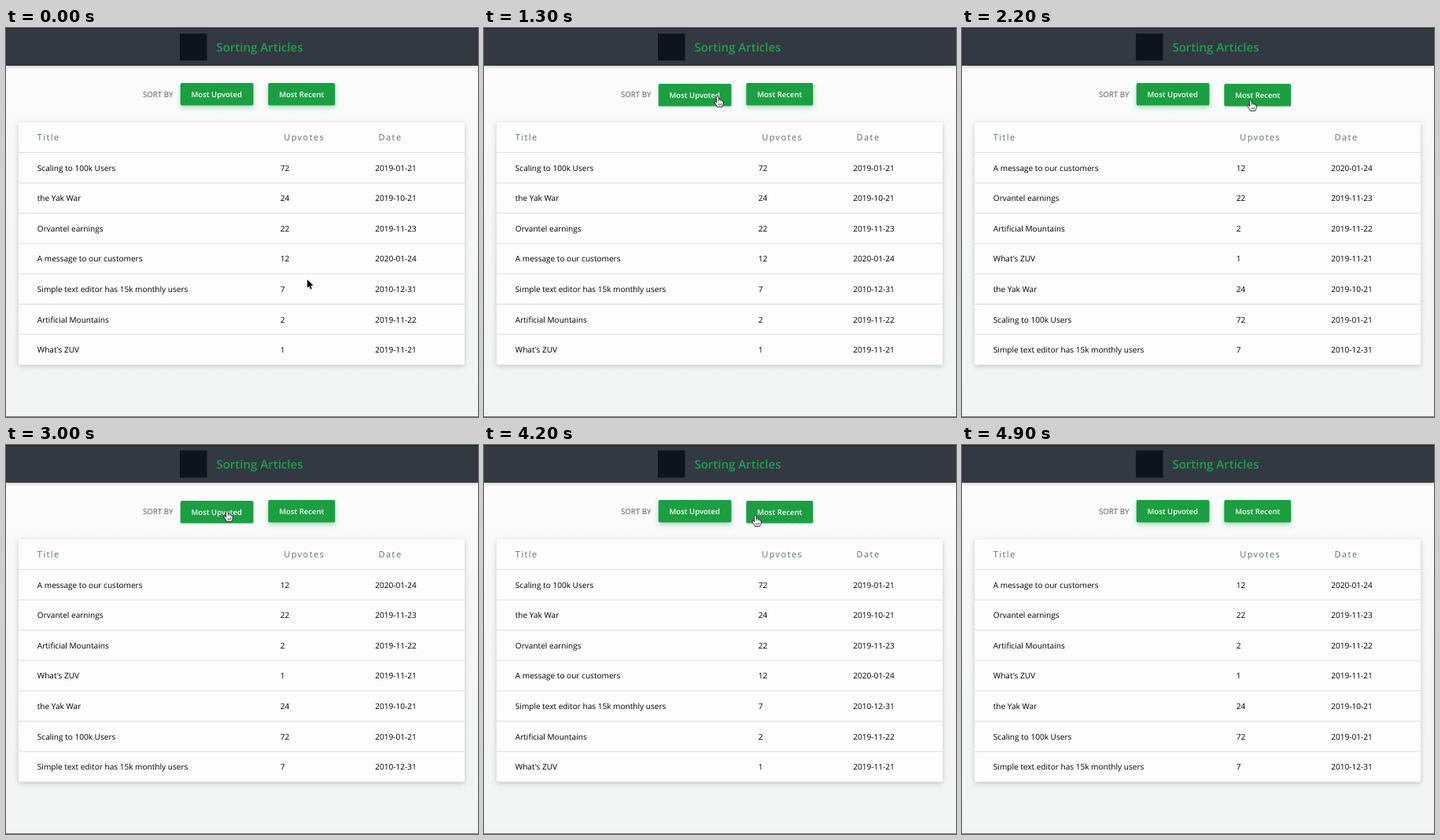
An HTML page for the animation above (5 s loop, 600 by 495 pixels).

```html
<!DOCTYPE html>
<html lang="en">
<head>
<meta charset="utf-8">
<title>Sorting Articles</title>
<style>
  html, body { margin: 0; width: 100%; height: 100%; overflow: hidden; }
  svg { display: block; width: 600px; height: 495px; }
  text {
    font: 10.08px "Open Sans", "Noto Sans", sans-serif;
    text-rendering: geometricPrecision;
    white-space: pre;
  }
  .top { filter: drop-shadow(0 1px 2px rgba(40, 50, 60, .3)); }
  .title { font-size: 15.05px; font-weight: 600; fill: #1ba345; }
  .label { font-size: 9.7px; fill: #555b60; }
  .head text { font-size: 11px; letter-spacing: 1.44px; fill: #5a7272; }
  .card { filter: drop-shadow(0 2px 3px rgba(60, 75, 85, .28)); }
  .button rect { fill: #1b9f42; filter: drop-shadow(0 3px 3px rgba(27, 159, 66, .36)); }
  .button text { font-size: 9.55px; font-weight: 600; fill: #fff; text-anchor: middle; }
  .button.over { transform: translateY(1px); }
  .button.over rect { filter: drop-shadow(0 1px 1px rgba(27, 159, 66, .22)); }
</style>
</head>
<body>
<svg viewBox="0 0 600 495">
  <defs>
    <linearGradient id="page" x1="0" y1="0" x2="0" y2="1">
      <stop offset=".1" stop-color="#fdfdfe"/>
      <stop offset=".35" stop-color="#f5f7f8"/>
      <stop offset="1" stop-color="#f1f4f5"/>
    </linearGradient>
  </defs>
  <rect width="600" height="495" fill="url(#page)"/>
  <rect y="494" width="600" height="1" fill="#777b7e"/>

  <rect class="top" width="600" height="48" fill="#323943"/>
  <rect width="600" height="1" fill="#20252c"/>
  <rect x="221" y="7" width="34.5" height="34.5" fill="#0e141e"/>
  <text class="title" x="267.4" y="29.8">Sorting Articles</text>

  <text class="label" x="174" y="87.6">SORT BY</text>
  <g class="button" id="upvoted">
    <rect x="221.7" y="70" width="92.8" height="28.4" rx="2"/>
    <text x="267.8" y="88">Most Upvoted</text>
  </g>
  <g class="button" id="recent">
    <rect x="333.3" y="70" width="85" height="28.4" rx="2"/>
    <text x="375.8" y="88">Most Recent</text>
  </g>

  <rect class="card" x="16" y="120" width="567" height="308.6" rx="2" fill="#fdfcfe"/>
  <g class="head">
    <text x="39.8" y="143.4">Title</text>
    <text x="353.2" y="143.4">Upvotes</text>
    <text x="473.6" y="143.4">Date</text>
  </g>
  <g id="table"></g>

  <g id="arrow">
    <path d="M0 0V10.6L2.4 8.4 4 12.3 5.9 11.5 4.3 7.7H7.6Z" fill="#000"
      stroke="#fff" stroke-width="1.4" paint-order="stroke"/>
  </g>
  <g id="hand" stroke="#111" stroke-width=".9" stroke-linejoin="round">
    <path fill="#fff" d="M-1.6 1.2C-1.6-.6 1-.6 1.1 1L1.4 4C2.4 3.2 3.6 3.6 3.8 4.6 4.8 4.1 5.8 4.6 5.9 5.6
      6.9 5.3 7.3 6 7.3 7V9C7.2 11 6 12 5.8 13.4H-.6C-.8 11.8-3 9.8-4 7.6-4.5 6.4-3 5.9-2.1 6.9L-1.2 7.8Z"/>
    <path fill="none" stroke-width=".7" d="M1.4 4V6.4M3.8 4.6V6.6M5.9 5.6V7M1.1 9v2.6M2.9 9v2.6M4.7 9v2.6"/>
  </g>
</svg>
<script>
const LOOP = 5000, ROW = 38.57, TOP = 158.5;
const $ = id => document.getElementById(id);

const articles = [
  ["Scaling to 100k Users", 72, "2019-01-21"],
  ["the Yak War", 24, "2019-10-21"],
  ["Orvantel earnings", 22, "2019-11-23"],
  ["A message to our customers", 12, "2020-01-24"],
  ["Simple text editor has 15k monthly users", 7, "2010-12-31"],
  ["Artificial Mountains", 2, "2019-11-22"],
  ["What's ZUV", 1, "2019-11-21"]
];
const byVotes = [...articles].sort((a, b) => b[1] - a[1]);
const byDate = [...articles].sort((a, b) => b[2].localeCompare(a[2]));

// start time, sort order
const sorts = [[0, byVotes], [1900, byDate], [3100, byVotes], [4700, byDate]];

// start time, pointer shape, tip x, tip y
const moves = [
  [0, "arrow", 383, 320], [100, "arrow", 347, 183],
  [300, "arrow", 328, 146], [400, "arrow", 312, 118], [500, "arrow", 302, 101],
  [600, "arrow", 296, 91], [700, "arrow", 292, 86],
  [900, "hand", 291, 86], [1300, "hand", 297, 87], [1400, "arrow", 318, 90],
  [1500, "hand", 343, 92], [1600, "hand", 358, 92], [1700, "hand", 365, 92],
  [1800, "hand", 367, 92], [2300, "hand", 360, 91], [2400, "hand", 343, 90],
  [2500, "arrow", 320, 88], [2600, "hand", 300, 86], [2700, "hand", 290, 85],
  [2800, "hand", 284, 84], [2900, "hand", 281, 84],
  [3300, "hand", 295, 75], [3400, "arrow", 330, 44], [3500, "arrow", 400, 12],
  [3600, "none"], [3700, "arrow", 472, 3], [3800, "arrow", 405, 54],
  [3900, "hand", 372, 80], [4000, "hand", 356, 88], [4100, "hand", 348, 90],
  [4200, "hand", 345, 90], [4800, "none"]
];

function add(parent, tag, attrs, text) {
  const el = document.createElementNS("http://www.w3.org/2000/svg", tag);
  for (const key in attrs) el.setAttribute(key, attrs[key]);
  if (text !== undefined) el.textContent = text;
  return parent.appendChild(el);
}

const columns = [39.8, 348.8, 469.2];
const rows = new Map();
articles.forEach((article, i) => {
  add($("table"), "rect", { x: 16, y: TOP - .5 + i * ROW, width: 567, height: 1, fill: "#dcdee1" });
});
for (const article of articles) {
  const row = add($("table"), "g", {});
  article.forEach((value, i) => add(row, "text", { x: columns[i], y: 23.2 }, value));
  rows.set(article, row);
}

const current = (steps, t) => steps.findLast(step => step[0] <= t);
let shownOrder, shownMove;

function draw(now) {
  const t = now % LOOP;
  const order = current(sorts, t)[1];
  const move = current(moves, t);
  if (order !== shownOrder) {
    order.forEach((article, i) =>
      rows.get(article).setAttribute("transform", `translate(0 ${TOP + i * ROW})`));
    shownOrder = order;
  }
  if (move !== shownMove) {
    const [, shape, x, y] = move;
    for (const id of ["arrow", "hand"]) {
      $(id).style.display = id === shape ? "" : "none";
      if (id === shape) $(id).setAttribute("transform", `translate(${x} ${y})`);
    }
    $("upvoted").classList.toggle("over", shape === "hand" && x < 320);
    $("recent").classList.toggle("over", shape === "hand" && x > 330);
    shownMove = move;
  }
}

const start = performance.now();
function tick() {
  draw(performance.now() - start);
  requestAnimationFrame(tick);
}
tick();
</script>
</body>
</html>
```
